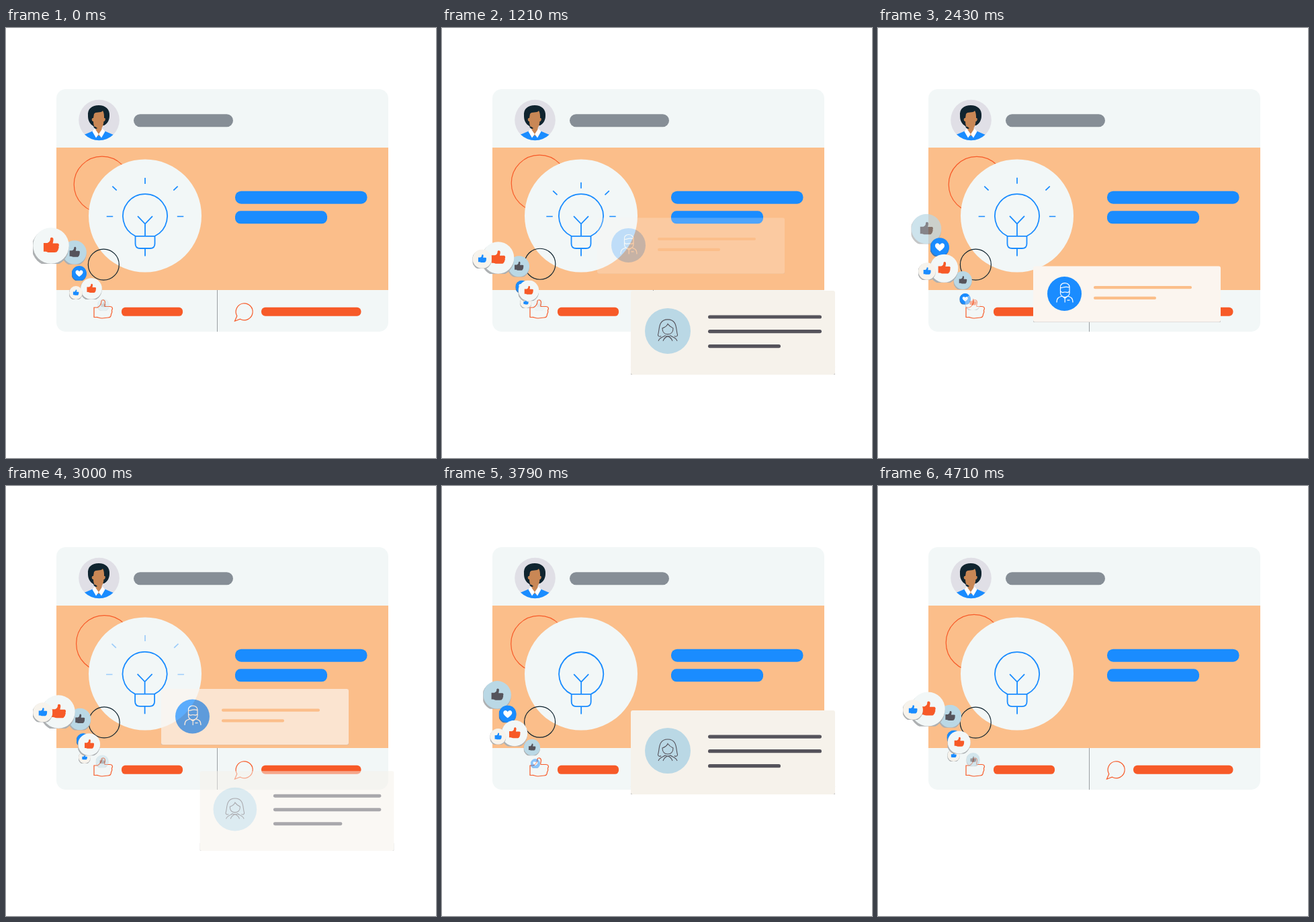
These frames come from a looping animation (640 by 640 pixels, 4.78 s). An HTML page with a canvas:

```html
<!DOCTYPE html>
<html lang="en">
<head>
<meta charset="utf-8">
<title>Social post</title>
<style>
html, body { margin: 0; width: 100%; height: 100%; overflow: hidden; background: #fff; }
canvas { display: block; width: 640px; height: 640px; }
</style>
</head>
<body>
<canvas id="stage" width="640" height="640"></canvas>
<script>
const LOOP = 4780, STEPS = 67, STEP = LOOP / STEPS;
const BLUE = '#1a8cff', ORANGE = '#f75a28', PEACH = '#fbbe8a', PALE = '#f2f7f7',
  SKY = '#bad8e5', SLATE = '#55535b', INK = '#10242f', CREAM = '#f6f2eb';

const main = document.getElementById('stage').getContext('2d');
const layer = Object.assign(document.createElement('canvas'), { width: 640, height: 640 }).getContext('2d');
let c = main;

const clamp = v => Math.max(0, Math.min(1, v));

function box(x, y, w, h, r, color) {
  c.fillStyle = color;
  c.beginPath();
  c.roundRect(x, y, w, h, r);
  c.fill();
}

function disc(x, y, r, color) {
  c.fillStyle = color;
  c.beginPath();
  c.arc(x, y, r, 0, 2 * Math.PI);
  c.fill();
}

function ring(x, y, r, color, width) {
  c.strokeStyle = color;
  c.lineWidth = width;
  c.beginPath();
  c.arc(x, y, r, 0, 2 * Math.PI);
  c.stroke();
}

function fill(path, color) {
  c.fillStyle = color;
  c.fill(new Path2D(path));
}

function stroke(path, color, width) {
  c.strokeStyle = color;
  c.lineWidth = width;
  c.stroke(new Path2D(path));
}

// Draws a group with one common opacity.
function faded(alpha, draw) {
  if (alpha <= 0) return;
  if (alpha >= 1) return draw();
  layer.clearRect(0, 0, 640, 640);
  c = layer;
  draw();
  c = main;
  c.globalAlpha = alpha;
  c.drawImage(layer.canvas, 0, 0);
  c.globalAlpha = 1;
}

// Linear interpolation through keys of [time, ...values].
function along(keys, time) {
  if (time <= keys[0][0]) return keys[0].slice(1);
  const i = keys.findIndex(key => key[0] > time);
  if (i < 0) return keys[keys.length - 1].slice(1);
  const a = keys[i - 1], b = keys[i], u = (time - a[0]) / (b[0] - a[0]);
  return a.slice(1).map((v, j) => v + (b[j + 1] - v) * u);
}

function portrait() {
  disc(138.5, 137, 30.3, '#e0dfe6');
  c.save();
  c.beginPath();
  c.arc(138.5, 137, 30.3, 0, 2 * Math.PI);
  c.clip();
  fill('M122 131C121 120 128 115 138 115C148 115 155 121 154 131C154 138 150 143 146 145L130 146C125 143 122 138 122 131Z', INK);
  fill('M131 128C133 124 142 127 144 123C146 126 146 130 146 134C149 133 148 139 145.5 139C145 145 143 148 142.500 149L143 156L138 162L133 156L133.500 149C131 147 130 143 130 139C127 139 127 133 130 134Z', '#c98755');
  fill('M130 146C131 150 134 151 136 149L133 147Z', INK);
  fill('M116 159L130 153L138 161L146 153L160 159L156 170H120Z', BLUE);
  fill('M132 149.500L138 158L134 163.500L128.500 154Z', '#fff');
  fill('M143.500 149.500L138 158L142 163.500L147.500 154Z', '#fff');
  c.restore();
}

function bulb(t) {
  for (let n = 0; n < 3; n++) {
    const age = t - 470 + 2390 * n;
    if (age < 0 || age > 2620) continue;
    const d = 16 * Math.pow(1 - age / 2620, 2.2), s = 0.82 * d;
    c.globalAlpha = Math.min(clamp(age / 380), clamp((2620 - age) / 240));
    stroke(`M207 ${222 + d}v9M${149 + s} 280.500h9.500M${265 - s} 280.500h-9.500` +
      `M${157.5 + d} ${234.8 + d}l6.300 6M${256.5 - d} ${234.8 + d}l-6.300 6`, BLUE, 1.7);
  }
  c.globalAlpha = 1;
  const shift = 0.4 * Math.cos(2 * Math.PI * (t - 1800) / 2390);
  c.save();
  c.translate(shift, shift / 2);
  stroke('M192.500 309.800A33 33 0 1 1 221.500 309.800ZM192.500 309.800V321Q192.500 328 199.500 328H214.500Q221.500 328 221.500 321V309.800' +
    'M196 280L207 291.500L218 280M207 291.500V309.800M207 328V339.500', BLUE, 1.8);
  c.restore();
}

function post(t) {
  const turn = 2 * Math.PI * t / LOOP;
  box(75, 91, 494, 361, 14, PALE);
  portrait();
  box(190, 128.3, 148, 19, 9.5, '#868e96');
  box(75, 178, 494, 212, 0, PEACH);
  ring(145 - 2 * Math.cos(turn), 233 - 2 * Math.sin(turn), 41.8, ORANGE, 1.2);
  disc(207, 279.5, 84, PALE);
  ring(145.6 + 0.6 * Math.sin(2 * turn - 0.5), 351.7 + 0.5 * Math.cos(2 * turn - 0.5), 23, INK, 1.2);
  bulb(t);
  box(341, 242.7, 196.5, 19, 9, BLUE);
  box(341, 272.3, 137, 19, 8, BLUE);
  box(314, 390, 1, 62, 0, '#9a9fa3');
  box(172, 415.8, 91, 13, 5.5, ORANGE);
  box(380, 415.8, 148.5, 13, 6, ORANGE);
  stroke('M343.800 428.500A12.500 12.500 0 1 1 348.500 433.200L340.500 436.300Z', ORANGE, 1.2);
  stroke('M131 416H136C140 414 142 411 142 406.500C143 404 147 404 147.500 408C147.500 411 146 413 147 414.500' +
    'H155C159 415 159 418 157.500 420C158.500 423 157 425 156.500 426C156.500 429 155 431 152 431L143 432C138 432 137 430 134.500 430.500H131Z', ORANGE, 1.2);
}

function shortReply(k) {
  const top = 393.9 - 6.56 * k;
  faded(Math.min(k / 5, (18.5 - k) / 6.5), () => {
    c.save();
    c.translate(0, top);
    box(231, 70, 279, 13.3, 1, '#b9b9bb');
    box(231, 0, 279, 83, 3, '#fbf5ef');
    disc(277.5, 41, 25.5, BLUE);
    stroke('M271.500 32C270 23 285 23 285 31V40C285 44 281 46 278.200 46C275 46 271.500 44 271.500 40ZM271.500 32C276 33 276 29 285 31.500' +
      'M271.500 37C274 41 276 38 278.200 38.500C281 38 283 41 285 37M266 54C266 47 269 46 274 44.500M282.500 44.500C287 46 290 47 290 54' +
      'M274 44.500L278.200 48L282.500 44.500M278.200 48V54M281.500 50.500H285.500', '#fff', 1.2);
    box(321, 29.5, 146, 4.2, 2, PEACH);
    box(321, 45.3, 93, 4.2, 2, PEACH);
    c.restore();
  });
}

const LONG_PATH = [[11, 497], [12, 494], [13, 490], [14, 483.5], [16, 461], [20, 430.5], [25, 396.5], [28, 377.5], [32, 352]];

function longReply(k) {
  faded(Math.min((k - 11) / 6, (31 - k) / 4.5), () => {
    const scale = 0.9 + 0.1 * clamp((k - 11) / 6);
    c.save();
    c.translate(433, along(LONG_PATH, k)[0]);
    c.scale(scale, scale);
    box(-152, 50, 304, 12.6, 1, '#aaa9ab');
    box(-152, -62.5, 304, 125, 3, CREAM);
    disc(-97, -2.5, 34, SKY);
    stroke('M-107 5C-109 7 -112 5 -111.500 3C-109 -3 -112 -19.500 -97 -19.500C-82 -19.500 -85 -3 -82.500 3C-82 5 -85 7 -87 5' +
      'M-105 -6.500C-101 -8 -98 -10 -97 -13C-95 -10 -92 -8 -89 -6.500C-89 -1 -92 2.500 -97 2.500C-102 2.500 -105 -1 -105 -6.500Z' +
      'M-111 12.500C-109 7 -104 7 -101 4.500Q-97 6.500 -93 4.500C-90 7 -85 7 -83 12.500M-104 12.500Q-102 7 -97 5.500Q-92 7 -90 12.500', SLATE, 1.1);
    box(-37, -26, 169, 5.2, 2.6, SLATE);
    box(-37, -4.4, 169, 5.2, 2.6, SLATE);
    box(-37, 17.6, 108, 5.2, 2.6, SLATE);
    c.restore();
  });
}

const THUMB = 'M-.41-.15H-.2C-.08-.2-.03-.28-.04-.4C0-.48 .13-.47 .13-.35C.13-.25 .1-.18 .1-.13H.35C.45-.13 .46-.02 .42 .05' +
  'C.44 .1 .43 .16 .4 .18C.4 .25 .38 .28 .35 .29C.33 .36 .28 .37 .2 .37H-.1C-.2 .37-.22 .32-.3 .32H-.41Z';
const HEART = 'M0 .46C-.2 .3-.5 .1-.5-.14C-.5-.45-.12-.5 0-.22C.12-.5 .5-.45 .5-.14C.5 .1 .2 .3 0 .46Z';

// Keys are [age in steps, x, y, radius].
const PERIOD = 22.8, ECHO = 17.95;
const bubbles = [
  { back: SKY, ink: SLATE, icon: THUMB, born: -1.5, rise: 7, end: 36.5, fall: 3.5,
    keys: [[0, 145, 412, 9], [2.2, 142, 408, 10], [7.4, 134, 389, 12.3], [19.2, 110, 347, 16.5], [22.8, 102, 334, 18], [34, 72, 299, 22.5], [36.5, 65, 291, 23]] },
  { back: BLUE, ink: '#fff', icon: HEART, born: 5.5, rise: 4, end: 37.5, fall: 3.5,
    keys: [[7.4, 139, 413, 7], [10, 132, 407, 8], [19.2, 115, 378, 10], [22.8, 109, 365, 11], [34, 92, 326, 14], [37, 87, 316, 14.5]] },
  { back: PALE, ink: ORANGE, icon: THUMB, born: -9.5, rise: 6, end: 27.3, fall: 3,
    keys: [[-8, 144, 412, 11], [0, 127, 388, 16], [7.4, 108, 368, 19.5], [19.2, 78, 336, 25], [22.8, 67, 324, 27], [27.5, 55, 311, 29]] },
  { back: '#f7f3ec', ink: BLUE, icon: THUMB, born: 12, rise: 4, end: 45.4, fall: 1.8,
    keys: [[12, 143, 418, 8], [19.2, 117, 404, 9], [22.8, 104, 394, 10], [34, 73, 362, 13], [43.2, 52, 333, 15], [46, 45, 325, 15.5]] }
];

function bubble(b, age) {
  faded(Math.min((age - b.born) / b.rise, (b.end - age) / b.fall), () => {
    const [x, y, r] = along(b.keys, age);
    c.save();
    c.translate(x, y);
    c.scale(r, r);
    c.beginPath();
    c.rect(-1, -1, 2, 2);
    c.clip();
    disc(-0.04, 0.1, 1.02, b.back === BLUE ? '#3f78b4' : '#adb0b2');
    disc(0, 0, 0.99, b.back);
    fill(b.icon, b.ink);
    c.restore();
  });
}

function reactions(step) {
  const phase = step % PERIOD;
  for (const b of bubbles)
    for (let n = 2; n >= 0; n--) bubble(b, phase + n * PERIOD);
  for (const b of bubbles) bubble(b, phase - ECHO);
}

const start = performance.now();

function frame() {
  const now = (performance.now() - start) % LOOP;
  const step = Math.floor((now + 8) / STEP) % STEPS;
  c.fillStyle = '#fff';
  c.fillRect(0, 0, 640, 640);
  post(step * STEP);
  for (const first of [0, 28]) shortReply(step - first);
  for (const first of [0, 28]) longReply(step - first);
  reactions(step);
  requestAnimationFrame(frame);
}
frame();
</script>
</body>
</html>
```
